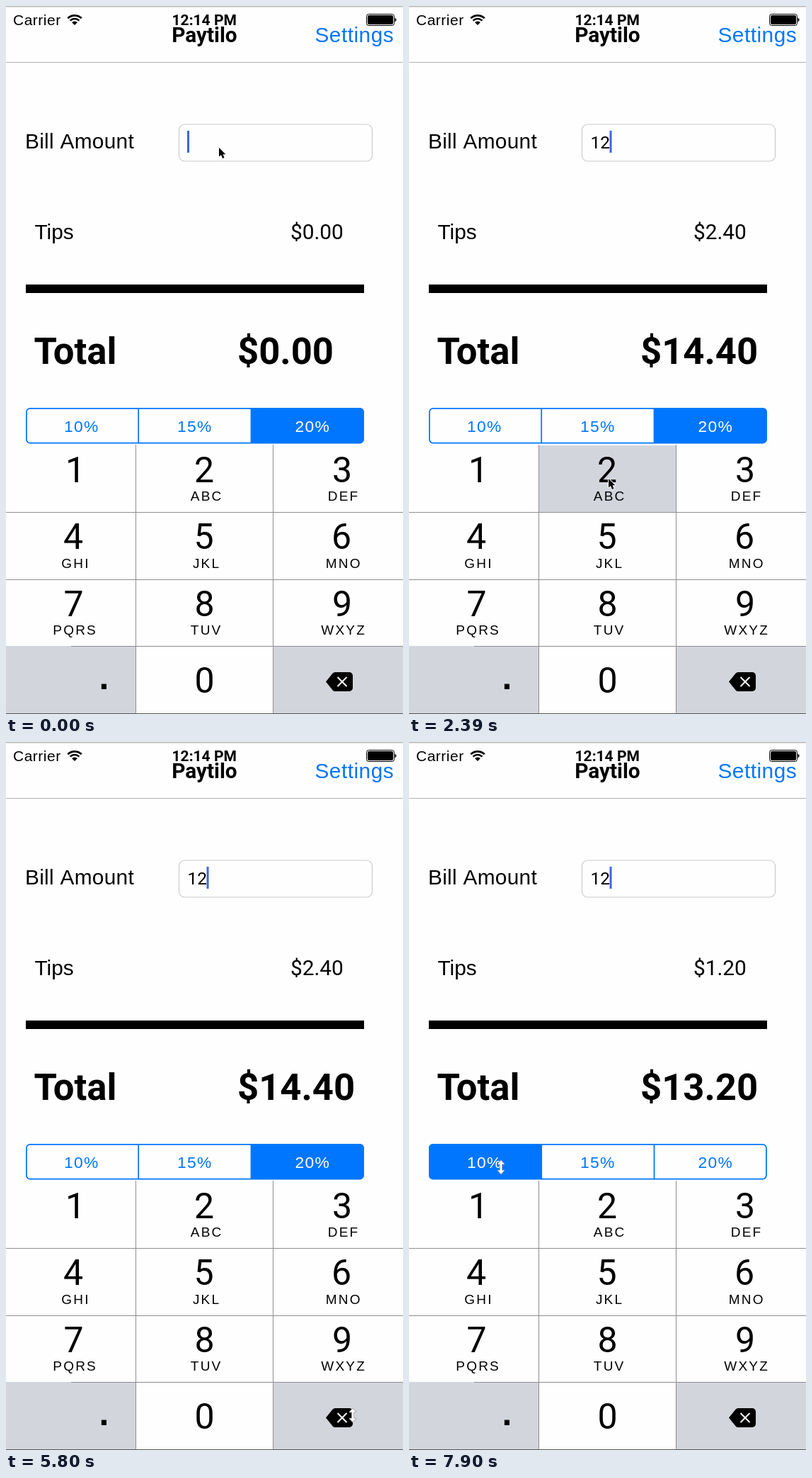
An HTML page with a canvas that plays this animation: 561 px wide and 999 px high, repeating every 8 s.

```html
<!DOCTYPE html>
<html lang="en">
<head>
<meta charset="utf-8">
<title>Tip calculator</title>
<style>
  html, body { margin: 0; width: 100%; height: 100%; overflow: hidden; background: #fefefe; }
  canvas { display: block; }
</style>
</head>
<body>
<canvas id="stage" width="561" height="999"></canvas>
<script>
const ctx = document.getElementById('stage').getContext('2d');
const LOOP = 8000;
const BLUE = '#0076ff', PAPER = '#fefefe', KEY_GREY = '#d2d5dc', LINE = '#8e8e8e';
const WORDS = '"Liberation Sans", Arial, sans-serif';
const FIGURES = 'Roboto, "Liberation Sans", sans-serif';
const HEAVY = 600;

// The screen refreshes in ticks of about 149 ms; all timing below is in ticks.
const tickAt = ms => Math.floor((ms + 22) / 149);

// The pointer leaves at `go`, arrives at `at` and there taps a key or a rate.
const MOVES = [
  { go: 7, at: 12, x: 113, y: 666, key: '1' },
  { go: 13, at: 15, x: 282, y: 667, key: '2' },
  { go: 16, at: 17, x: 284, y: 838 },
  { go: 19, at: 21, x: 289, y: 964, key: '0' },
  { go: 25, at: 30, x: 405, y: 416 },
  { go: 30, at: 33, x: 519, y: 965 },
  { go: 33, at: 36, x: 490, y: 950, key: 'del' },
  { go: 41, at: 47, x: 256, y: 604, rate: 1 },
  { go: 49, at: 52, x: 130, y: 600, rate: 0 }
];
const HOME = { x: 301, y: 200 };
const KEY_TAPS = MOVES.filter(m => m.key);
const RATE_TAPS = MOVES.filter(m => 'rate' in m);
const RESIZE_FROM = 20;

const RATES = [10, 15, 20], RATE_X = [106.5, 266.5, 433];
const LETTERS = ['', 'ABC', 'DEF', 'GHI', 'JKL', 'MNO', 'PQRS', 'TUV', 'WXYZ'];
const COLS = [0, 184, 378, 561], DIGIT_X = [95, 280.5, 474.5];
const rowY = row => Math.round(619.5 + 94.7 * row);

const money = n => '$' + n.toFixed(2);
const ease = k => k * k * (3 - 2 * k);
const release = tap => tap.at + (tap.key === 'del' ? 3 : 2);

function rect(x, y, w, h, color) {
  ctx.fillStyle = color;
  ctx.fillRect(x, y, w, h);
}

function setFont(size, weight = 'normal', spacing = 0, family = WORDS) {
  ctx.font = `${weight} ${size}px ${family}`;
  ctx.letterSpacing = spacing + 'px';
}

// Places the visible ink of the text at x, by its left edge or its middle.
function text(str, x, y, { size, weight, spacing, family, color = '#000', center = false }) {
  setFont(size, weight, spacing, family);
  const m = ctx.measureText(str);
  const left = -m.actualBoundingBoxLeft, right = m.actualBoundingBoxRight;
  ctx.fillStyle = color;
  ctx.fillText(str, x - (center ? (left + right) / 2 : left), y);
}

function polygon(points) {
  ctx.beginPath();
  points.forEach(([x, y]) => ctx.lineTo(x, y));
  ctx.closePath();
}

function box(x, y, w, h, r) {
  ctx.beginPath();
  ctx.roundRect(x, y, w, h, r);
}

function wifi(x, y) {
  const from = -Math.PI * 0.75, to = -Math.PI * 0.25;
  ctx.strokeStyle = ctx.fillStyle = '#000';
  ctx.lineWidth = 2.7;
  for (const r of [9, 13.7]) {
    ctx.beginPath();
    ctx.arc(x, y, r, from, to);
    ctx.stroke();
  }
  ctx.beginPath();
  ctx.moveTo(x, y);
  ctx.arc(x, y, 5.6, from, to);
  ctx.fill();
}

function battery() {
  ctx.strokeStyle = ctx.fillStyle = '#000';
  ctx.lineWidth = 1;
  box(509.5, 11.5, 39, 16, 3);
  ctx.stroke();
  box(511, 13, 36, 13, 2);
  ctx.fill();
  box(549.5, 17, 2, 5, [0, 2, 2, 0]);
  ctx.fill();
}

function header() {
  rect(0, 0, 561, 1.5, '#b9b9b9');
  rect(0, 79, 561, 1, '#b4b4b4');
  text('Carrier', 11, 27, { size: 21, spacing: 0.5 });
  wifi(97, 27);
  text('12:14 PM', 280.5, 27, { size: 21, weight: HEAVY, family: FIGURES, center: true });
  battery();
  text('Paytilo', 280.5, 51, { size: 29.8, weight: HEAVY, family: FIGURES, center: true });
  text('Settings', 437.5, 51, { size: 29.8, spacing: 0.5, color: BLUE });
}

function billAt(tick) {
  return KEY_TAPS.filter(tap => tap.at < tick)
    .reduce((bill, { key }) => key === 'del' ? bill.slice(0, -1) : bill + key, '');
}

// The caret blinks every 7 ticks, starting 3 ticks after the last key is let go.
function caretAlpha(tick) {
  const last = KEY_TAPS.filter(tap => tap.at < tick).pop();
  const idle = tick - 3 - (last ? release(last) : -1);
  const phase = idle % 7;
  if (idle < 0 || phase > 3) return 1;
  return phase % 3 ? 0 : 0.5;
}

function billField(bill, tick) {
  text('Bill Amount', 29, 201, { size: 29.8, spacing: 0.3 });
  ctx.strokeStyle = '#cbcbcb';
  ctx.lineWidth = 1.2;
  box(244.5, 167, 273, 52, 8);
  ctx.stroke();
  setFont(24.5, 'normal', 0, FIGURES);
  ctx.fillStyle = '#000';
  ctx.fillText(bill, 256.5, 201);
  ctx.globalAlpha = caretAlpha(tick);
  rect(256 + ctx.measureText(bill).width, 176, 3, 31, '#3f66dc');
  ctx.globalAlpha = 1;
}

function totals(bill, percent) {
  const amount = Number(bill), tip = amount * percent / 100;
  const big = { size: 52.6, weight: HEAVY, family: FIGURES };
  text('Tips', 40.5, 329, { size: 29.8 });
  text(money(tip), 403, 329, { size: 29.8, family: FIGURES });
  rect(28, 393, 478, 12, '#000');
  text('Total', 40.5, 505, big);
  text(money(amount + tip), 329, 505, big);
}

// Blue fading to white by k.
const tint = k => `rgb(${255 * k}, ${118 + 137 * k}, 255)`;

// A tapped rate fades in over one tick while the old one fades out.
function rateAt(tick) {
  const taps = [{ at: -2, rate: 2 }, ...RATE_TAPS].filter(tap => tap.at <= tick);
  const now = taps.pop();
  const fading = tick === now.at;
  const glow = i => {
    if (i === now.rate) return fading ? 0.65 : 1;
    return fading && i === taps[taps.length - 1].rate ? 0.44 : 0;
  };
  return { rate: now.rate, glow };
}

function segments(glow) {
  const edge = i => 28 + i * 159.3;
  ctx.save();
  box(28, 567, 478, 50, 6);
  ctx.clip();
  RATES.forEach((percent, i) => {
    const on = glow(i);
    if (on) rect(edge(i), 567, 159.3, 50, tint(1 - on));
    text(percent + '%', RATE_X[i], 600.5, { size: 22.8, spacing: 1.3, color: tint(on), center: true });
  });
  ctx.restore();
  for (const i of [1, 2]) rect(edge(i) - 1, 567, 1.75, 50, BLUE);
  ctx.strokeStyle = BLUE;
  ctx.lineWidth = 1.75;
  box(28.9, 567.9, 476, 48.6, 5);
  ctx.stroke();
}

function backspace() {
  ctx.fillStyle = '#000';
  ctx.beginPath();
  ctx.moveTo(452, 953.5);
  ctx.arcTo(463, 940, 470, 940, 5);
  ctx.arcTo(490, 940, 490, 950, 5);
  ctx.arcTo(490, 967, 480, 967, 5);
  ctx.arcTo(463, 967, 452, 953.5, 5);
  ctx.fill();
  ctx.strokeStyle = '#fff';
  ctx.lineWidth = 2;
  ctx.beginPath();
  for (const d of [-6.5, 6.5]) {
    ctx.moveTo(475 - d, 947);
    ctx.lineTo(475 + d, 960);
  }
  ctx.stroke();
}

function fillKey(col, row, color) {
  rect(COLS[col], rowY(row), COLS[col + 1] - COLS[col], rowY(row + 1) - rowY(row), color);
}

function keypad(pressed) {
  const digitStyle = { size: 50, family: FIGURES, center: true };
  fillKey(0, 3, KEY_GREY);
  rect(0, 903, 92, 1, KEY_GREY);
  fillKey(2, 3, pressed === 'del' ? PAPER : KEY_GREY);
  if (pressed === '0') fillKey(1, 3, KEY_GREY);
  LETTERS.forEach((letters, i) => {
    const col = i % 3, row = Math.floor(i / 3), digit = String(i + 1);
    if (pressed === digit) fillKey(col, row, KEY_GREY);
    text(digit, DIGIT_X[col], 671.5 + row * 94.7, digitStyle);
    text(letters, DIGIT_X[col] + 1.7, 698 + row * 94.7, { size: 19, spacing: 2.2, center: true });
  });
  text('.', 138.5, 964, { size: 50, weight: 'bold', center: true });
  text('0', DIGIT_X[1], 968.5, digitStyle);
  backspace();
  for (const x of [183, 377]) rect(x, 619, 1, 379, LINE);
  for (const row of [1, 2]) rect(0, rowY(row), 561, 1, LINE);
  rect(92, 903, 469, 1, LINE);
  rect(0, 998, 561, 1, '#555');
}

function pointerAt(tick) {
  return MOVES.filter(m => m.go <= tick).reduce((p, { go, at, x, y }) => {
    const k = ease(Math.min(1, (tick - go) / (at - go)));
    return { x: p.x + (x - p.x) * k, y: p.y + (y - p.y) * k };
  }, HOME);
}

function pointer(tick) {
  const { x, y } = pointerAt(tick);
  ctx.save();
  ctx.translate(x, y);
  ctx.lineJoin = 'round';
  if (tick < RESIZE_FROM) {
    polygon([[0, 0], [0, 12.5], [3, 10], [5, 15], [7.5, 14], [5.5, 9.3], [9.3, 9.3]]);
    ctx.strokeStyle = '#fff';
    ctx.fillStyle = '#000';
    ctx.lineWidth = 2;
  } else {
    const top = [[0, -9.5], [4.5, -4.5], [1.2, -4.5]];
    const right = [...top, ...top.map(([a, b]) => [a, -b]).reverse()];
    polygon([...right, ...right.map(([a, b]) => [-a, b]).reverse()]);
    ctx.strokeStyle = '#999';
    ctx.fillStyle = '#fff';
    ctx.lineWidth = 1.4;
  }
  ctx.stroke();
  ctx.fill();
  ctx.restore();
}

function draw(ms) {
  const tick = tickAt(ms);
  const bill = billAt(tick);
  const { rate, glow } = rateAt(tick);
  const held = KEY_TAPS.find(tap => tap.at <= tick && tick < release(tap));
  rect(0, 0, 561, 999, PAPER);
  header();
  billField(bill, tick);
  totals(bill, RATES[rate]);
  segments(glow);
  keypad(held ? held.key : '');
  pointer(tick);
}

const begin = performance.now();
function frame() {
  draw((performance.now() - begin) % LOOP);
  requestAnimationFrame(frame);
}
frame();
</script>
</body>
</html>
```
